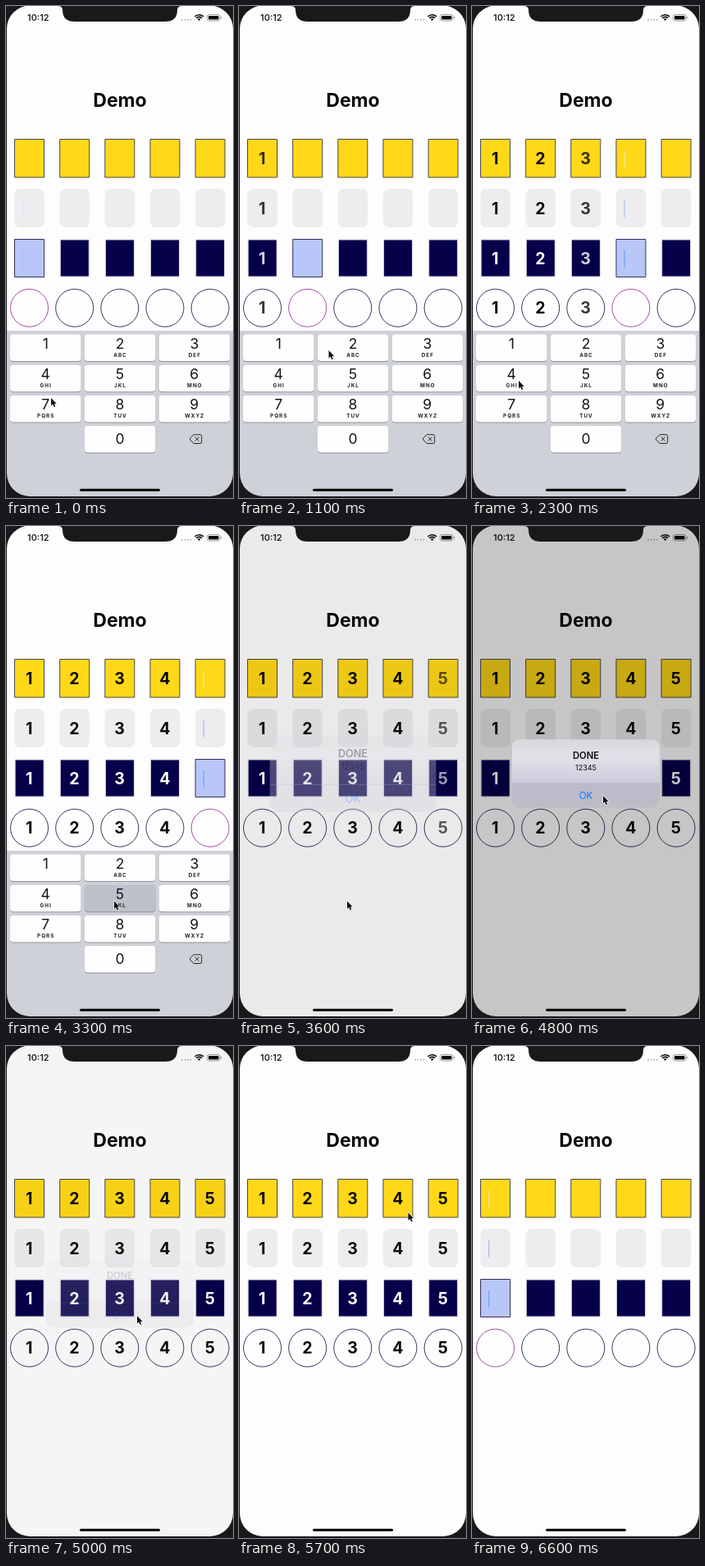
Write an HTML page with a canvas that moves like this. It is 277 px wide and 600 px high and loops after 6.7 s.

```html
<!DOCTYPE html>
<html lang="en">
<head>
<meta charset="utf-8">
<title>Code input demo</title>
<style>
  html, body { margin: 0; width: 100%; height: 100%; overflow: hidden; background: #1b181b; }
  canvas { display: block; width: 277px; height: 600px; }
</style>
</head>
<body>
<canvas id="stage"></canvas>
<script>
const W = 277, H = 600, LOOP = 6700;
const FONT = 'Inter, "Liberation Sans", sans-serif';
const NAVY = '#06004a', INK = '#0b0a0c', PAPER = '#fefdfe';
const canvas = document.getElementById('stage');
const ctx = canvas.getContext('2d');
const ratio = window.devicePixelRatio || 1;
canvas.width = W * ratio;
canvas.height = H * ratio;

const typedAt = [750, 1350, 1950, 2600, 3320];
const erasedAt = [6420, 6290, 6160, 6030, 5900];
const letters = ['', 'ABC', 'DEF', 'GHI', 'JKL', 'MNO', 'PQRS', 'TUV', 'WXYZ'];
// Pointer stops: time, x, y
const pointerPath = [
  [0, 55, 478], [650, 60, 413], [850, 62, 414], [1100, 109.5, 420], [1300, 135, 416],
  [1450, 135, 416], [1800, 222, 416], [2000, 222, 416], [2300, 57, 457], [2700, 57, 457],
  [3150, 132, 457.5], [3700, 132, 457.5], [4450, 160, 329], [5400, 160, 329], [5800, 215, 180]
];
const POINTER_HIDDEN = 6050;

const clamp = v => Math.max(0, Math.min(1, v));
const progress = (t, start, length) => clamp((t - start) / length);
const ease = p => p * p * (3 - 2 * p);

function box(x, y, w, h, r, fill, stroke) {
  ctx.beginPath();
  ctx.roundRect(x, y, w, h, r);
  if (fill) { ctx.fillStyle = fill; ctx.fill(); }
  if (stroke) { ctx.strokeStyle = stroke; ctx.lineWidth = 1; ctx.stroke(); }
}

function label(text, x, baseline, size, weight, color, spacing = 0) {
  ctx.font = `${weight} ${size}px ${FONT}`;
  ctx.letterSpacing = spacing + 'px';
  ctx.textAlign = 'center';
  ctx.fillStyle = color;
  ctx.fillText(text, x + spacing / 2, baseline);
}

function withAlpha(alpha, draw) {
  if (alpha <= 0) return;
  ctx.save();
  ctx.globalAlpha *= alpha;
  draw();
  ctx.restore();
}

function drawStatusBar() {
  label('10:12', 39.3, 18, 10.8, 600, '#232124');
  for (let i = 0; i < 4; i++) box(214 + i * 3.5, 15.8, 2, 2, 1, '#b5b3b6');
  ctx.strokeStyle = ctx.fillStyle = INK;
  ctx.lineWidth = 1.6;
  for (const r of [7.3, 4.6]) {
    ctx.beginPath();
    ctx.arc(235.7, 18, r, -Math.PI * 0.76, -Math.PI * 0.24);
    ctx.stroke();
  }
  ctx.beginPath();
  ctx.moveTo(235.7, 18);
  ctx.arc(235.7, 18, 2.5, -Math.PI * 0.76, -Math.PI * 0.24);
  ctx.fill();
  box(245.5, 10.5, 15.5, 7.5, 2.2, null, '#99979a');
  box(247, 12, 12.5, 4.5, 1, INK);
  box(262, 13, 1.2, 2.6, 0.6, '#99979a');
}

function drawFields(t) {
  const shown = typedAt.map((start, i) => t >= start && t < erasedAt[i]);
  const active = shown.filter(Boolean).length;
  const blink = ((t / 1000) % 1 + 0.88) % 1;
  const caretAlpha = clamp(Math.min(blink / 0.1, (0.92 - blink) / 0.25));

  for (let i = 0; i < 5; i++) {
    const cx = 28.5 + i * 55.15, x = cx - 18, on = i === active;
    box(x, 162.5, 36, 46.5, 0, '#ffd817', '#4b4650');
    box(x - 0.2, 223, 36.5, 47, 7, '#eeecef');
    if (on) box(x, 284.5, 36, 46, 0, '#b8c6f8', '#34305f');
    else box(x + 0.6, 285, 35, 45, 0, NAVY, '#d9d7e4');
    ctx.beginPath();
    ctx.arc(cx, 368.2, 23, 0, Math.PI * 2);
    ctx.strokeStyle = on ? '#a04fa6' : '#39345f';
    ctx.lineWidth = 1;
    ctx.stroke();

    if (on) withAlpha(caretAlpha, () => {
      ['#f6e9a0', '#a9b8ee', '#6ea0f6'].forEach((color, row) =>
        box(cx - 8.5, 176 + row * 61, 1.2, 20.5, 0.5, color));
    });
    if (shown[i]) withAlpha(progress(t, typedAt[i] - 10, 440), () => {
      [193, 254, 314.7, 375.2].forEach((y, row) =>
        label(i + 1, cx - 0.2, y, 19.5, 700, row === 2 ? '#fff' : INK));
    });
  }
}

function drawBackspace() {
  ctx.strokeStyle = '#2b2a2d';
  ctx.lineWidth = 1;
  ctx.lineJoin = 'round';
  ctx.stroke(new Path2D('M224 528 L229 522.7 H237 Q238.7 522.7 238.7 524.4 V531.8 Q238.7 533.5 237 533.5 H229 Z M230.8 525.6 L235.6 530.5 M235.6 525.6 L230.8 530.5'));
}

function drawKeyboard(t) {
  const slide = progress(t, 3320, 260);
  if (slide === 1 || t > 3600) return;
  ctx.save();
  ctx.translate(0, 204 * ease(slide));
  box(0, 396, W, 210, 0, '#ced1d7');
  for (let n = 1; n <= 10; n++) {
    const digit = n % 10, col = digit ? (n - 1) % 3 : 1, row = Math.floor((n - 1) / 3);
    const x = 5 + col * 90.8, y = 400.5 + row * 37.2, cx = x + 43.2;
    const since = t - typedAt[digit - 1];
    const pressed = since >= -70 && since < 60;
    box(x, y + 1, 86.5, 32.5, 4, '#8f9297');
    box(x, y, 86.5, 32.5, 4, pressed ? '#bcc1ca' : '#fefefe');
    label(digit, cx, y + (digit ? 17.3 : 22), 17.5, 400, '#151416');
    if (digit) label(letters[digit - 1], cx, y + 27.2, 6.3, 700, '#222124', 1);
  }
  drawBackspace();
  ctx.restore();
}

function drawAlert(t) {
  const enter = progress(t, 3500, 300);
  const alpha = enter * (1 - progress(t, 4830, 200));
  withAlpha(alpha, () => {
    box(0, 0, W, H, 0, 'rgba(0, 0, 0, 0.22)');
    const scale = 1 + 0.19 * (1 - enter);
    ctx.translate(139, 302);
    ctx.scale(scale, scale);
    ctx.translate(-139, -302);
    const glass = ctx.createLinearGradient(0, 260, 0, 344);
    glass.addColorStop(0, '#d9d7dc');
    glass.addColorStop(0.25, '#e2e0e8');
    glass.addColorStop(0.62, '#cfcddd');
    glass.addColorStop(1, '#d2d0d9');
    box(49, 260.3, 180, 83.2, 9, glass);
    if (t >= 4680) box(49, 314, 180, 29.5, [0, 0, 9, 9], 'rgba(20, 15, 40, 0.1)');
    box(49, 313.4, 180, 0.7, 0, '#b4b2bf');
    label('DONE', 139, 284.3, 11.2, 600, INK);
    label('12345', 139, 297.6, 9, 400, INK);
    label('OK', 139, 333, 11.6, 400, '#0a7aff');
  });
}

function drawPointer(t) {
  if (t >= POINTER_HIDDEN) return;
  const next = pointerPath.findIndex(stop => stop[0] > t);
  const [t1, x1, y1] = next < 0 ? pointerPath.at(-1) : pointerPath[next];
  const [t0, x0, y0] = next < 0 ? pointerPath.at(-1) : pointerPath[next - 1];
  const p = t1 > t0 ? ease((t - t0) / (t1 - t0)) : 1;
  ctx.save();
  ctx.translate(x0 + (x1 - x0) * p, y0 + (y1 - y0) * p);
  const arrow = new Path2D('M0 0 V9.4 L2.1 7.5 L3.7 11 L5.3 10.3 L3.8 6.9 H6.7 Z');
  ctx.strokeStyle = '#fff';
  ctx.lineWidth = 1.2;
  ctx.stroke(arrow);
  ctx.fillStyle = '#111';
  ctx.fill(arrow);
  ctx.restore();
}

function drawDevice() {
  box(90, 588.8, 98, 3, 1.5, '#050505');
  const bezel = new Path2D(`M0 0 H${W} V${H} H0 Z`);
  const screen = new Path2D();
  screen.roundRect(1, -0.5, 276, 598.5, 28);
  bezel.addPath(screen);
  ctx.fillStyle = '#1b181b';
  ctx.fill(bezel, 'evenodd');
  ctx.fill(new Path2D('M63 0 Q69 0 69 5 Q69 19 84 19 H194 Q209 19 209 5 Q209 0 215 0 Z'));
}

function draw(t) {
  ctx.setTransform(ratio, 0, 0, ratio, 0, 0);
  box(0, 0, W, H, 0, PAPER);
  drawStatusBar();
  label('Demo', 139, 123.2, 23, 700, INK);
  drawFields(t);
  drawKeyboard(t);
  drawAlert(t);
  drawDevice();
  drawPointer(t);
}

let start;
function tick(now) {
  start ??= now;
  draw((now - start) % LOOP);
  requestAnimationFrame(tick);
}
requestAnimationFrame(tick);
</script>
</body>
</html>
```
